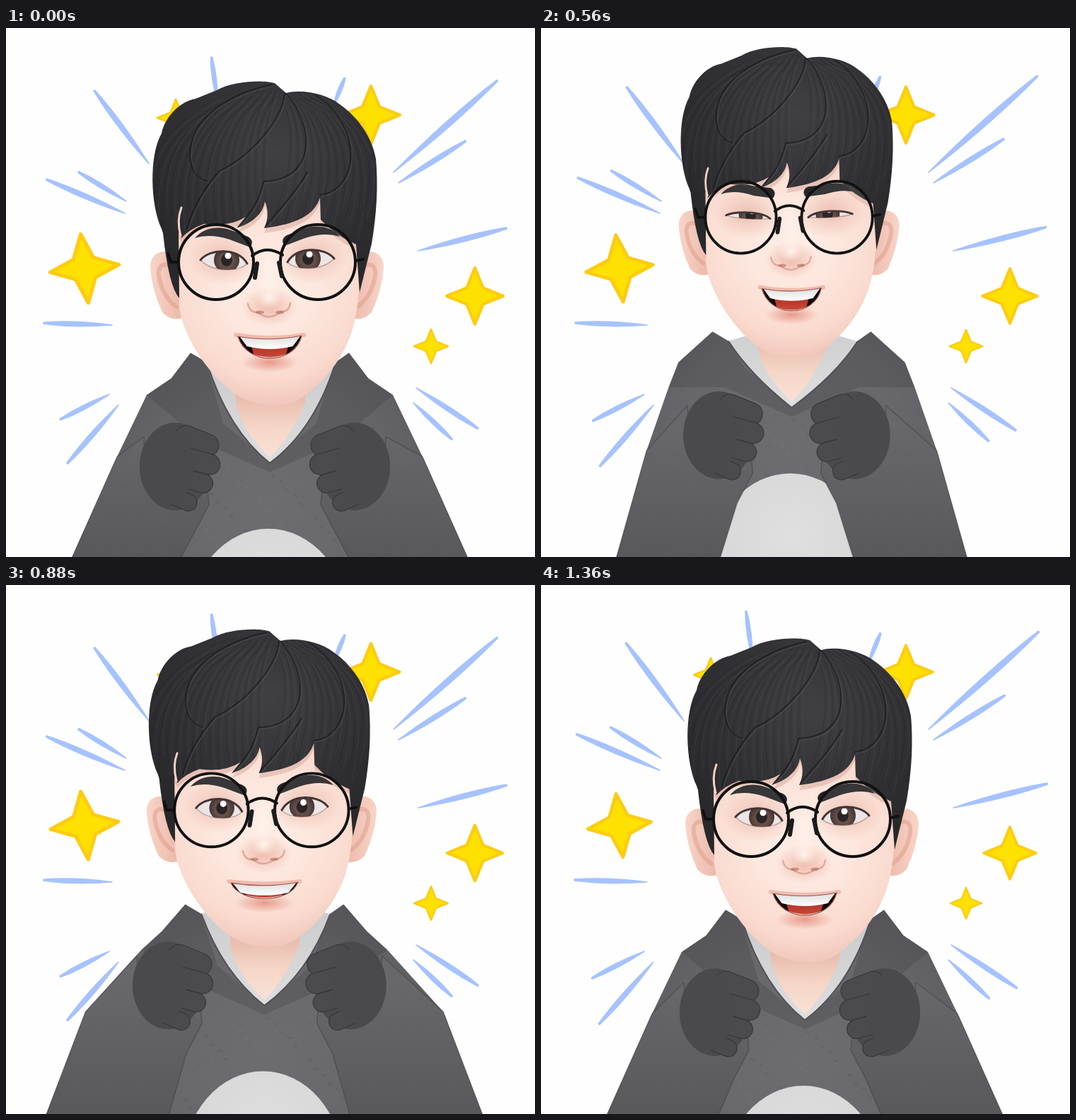
Animation of 748 by 748 pixels, one loop 1.44 s. Source, as an HTML page with a canvas:

```html
<!DOCTYPE html>
<html lang="en">
<head>
<meta charset="utf-8">
<title>Cheering avatar</title>
<style>
  html, body { margin: 0; width: 100%; height: 100%; overflow: hidden; background: #fff; }
  canvas { display: block; width: 100vw; height: 100vh; }
</style>
</head>
<body>
<canvas id="stage" width="748" height="748"></canvas>
<script>
const ctx = document.getElementById('stage').getContext('2d');
const STEP = 80, STEPS = 18;

// x, y: tip of the neckline, from which the body and head follow.
// flare: elbows out; nod: face moved down; spread, hand: fists about the neckline.
const cheer = { x: 373, y: 614, flare: 0, nod: 0, spread: 119, hand: 6, mouth: 31, eye: 25, frown: 7 };
const clap = { x: 353, y: 506, flare: 0, nod: 6, spread: 50, hand: 170, mouth: 29, eye: 36, frown: 4 };
const open = { ...clap, x: 350, y: 509, nod: -10, spread: 100, hand: 120, mouth: 46, eye: 35, frown: -3 };
const blink = { ...cheer, x: 356, y: 545, nod: -3, spread: 84, hand: 12, mouth: 28, eye: 0, frown: 1 };
const wide = { ...cheer, x: 363, y: 585, flare: 1, nod: 7, spread: 128, hand: -25, mouth: 20, eye: 27 };
const lean = { ...cheer, x: 372, y: 618, spread: 102, hand: -34 };
const rest = { ...cheer, spread: 112, hand: -10 };

// step, pose, ray length, star size
const keys = [
  [0, cheer, .94, 1], [2, clap, .91, .97], [5, open, 1, .97], [8, blink, .98, .97],
  [10, wide, .91, 1.02], [13, lean, 1, .92], [17, rest, 1, .92], [18, cheer, .94, 1]
];
// inner and outer end of each ray
const rays = [
  [202, 192, 120, 82], [168, 262, 50, 211], [170, 245, 98, 201], [150, 420, 47, 417],
  [146, 518, 72, 556], [159, 533, 82, 621], [548, 204, 704, 66], [555, 219, 656, 156],
  [583, 315, 716, 281], [580, 509, 673, 570], [576, 530, 634, 585], [299, 105, 290, 37], [463, 110, 480, 68]
];
// centre and radius
const stars = [[111, 340, 50], [516, 123, 42], [663, 379, 41], [601, 450, 25], [240, 127, 27]];

const skin = new Path2D('M240 290 Q242 375 250 410 C262 450 290 490 322 515 C348 534 392 541 420 523 C455 498 486 460 496 410 Q505 365 504 280 L480 180 H260Z');
const ear = new Path2D('M-129 322 C-143 311 -165 316 -165 338 Q-163 370 -148 402 Q-135 416 -117 409Z');
const earFold = new Path2D('M-131 342 C-145 328 -155 336 -153 350 Q-148 380 -128 394');
const hair = new Path2D('M222 284 C206 250 204 180 222 149 C226 128 246 104 270 100 L300 88 C322 75 365 73 382 78 L398 92 C420 86 455 93 474 108 C500 126 520 155 525 185 Q530 240 519 305 L502 374 L497 306 Q468 294 447 271 L446 240 C438 264 415 277 367 283 Q376 264 368 245 C366 262 350 276 328 283 L341 267 Q318 282 282 277 Q262 284 250 297 L246 288 L247 382 Q232 365 224 290Z');
const locks = new Path2D('M378 80 C330 90 262 120 262 180 Q264 210 286 217 M396 93 C392 130 350 180 304 202 Q270 240 258 284 M398 92 C440 140 440 215 366 217 Q358 255 330 280 M440 95 C510 140 500 230 446 236 M428 204 Q412 232 368 281');

const lerp = (a, b, t) => a + (b - a) * t;
const mix = (a, b, t) => Object.fromEntries(Object.keys(a).map(k => [k, lerp(a[k], b[k], t)]));
const times = (n, draw) => { for (let i = 0; i < n; i++) draw(i); };

function fill(path, color) { ctx.fillStyle = color; ctx.fill(path); }
function stroke(path, color, width) {
  ctx.strokeStyle = color;
  ctx.lineWidth = width;
  ctx.stroke(path);
}
function poly(points) {
  const p = new Path2D();
  for (const [x, y] of points) p.lineTo(x, y);
  p.closePath();
  return p;
}
function oval(x, y, rx, ry) {
  const p = new Path2D();
  p.ellipse(x, y, rx, ry, 0, 0, Math.PI * 2);
  return p;
}
function shade(g, colors) {
  colors.forEach((c, i) => g.addColorStop(i / (colors.length - 1), c));
  return g;
}
const radial = (x, y, r, ...colors) => shade(ctx.createRadialGradient(x, y, 0, x, y, r), colors);
const linear = (x0, y0, x1, y1, ...colors) => shade(ctx.createLinearGradient(x0, y0, x1, y1), colors);
function glow(x, y, rx, ry, rgb, alpha) {
  at(x, y, rx, ry, () => fill(oval(0, 0, 1, 1), radial(0, 0, 1, `rgba(${rgb},${alpha})`, `rgba(${rgb},0)`)));
}
function at(x, y, sx, sy, draw) {
  ctx.save();
  ctx.translate(x, y);
  ctx.scale(sx, sy);
  draw();
  ctx.restore();
}
function inside(path, draw) {
  ctx.save();
  ctx.clip(path);
  draw();
  ctx.restore();
}

function drawRays(size) {
  for (const [x, y, ex, ey] of rays) at(x, y, 1, 1, () => {
    const full = Math.hypot(ex - x, ey - y), len = full * size, w = 5 + full * .02;
    ctx.rotate(Math.atan2(ey - y, ex - x));
    const p = new Path2D(`M0 0 Q${len * .55} ${-w * .8} ${len} -1 V1 Q${len * .55} ${w * .8} 0 0Z`);
    fill(p, '#a6c2ff');
    stroke(p, '#a6c2ff', 1.6);
  });
}
function drawStars(size) {
  stars.forEach(([x, y, r], n) => at(x, y, size, size, () => {
    const points = [];
    times(8, i => {
      const a = i * Math.PI / 4 - Math.PI / 2, d = (r - 1) * (i % 2 ? .41 : 1);
      points.push([Math.cos(a) * d, Math.sin(a) * d]);
    });
    ctx.rotate(n ? 0 : -.11);
    fill(poly(points), '#ffe100');
    stroke(poly(points), '#ffcb12', r * .1);
  }));
}

// one side of the coat, from the hood down to the elbow
function outline({ x, y, flare }, side) {
  const q = (y - 506) / 110;
  return [
    [112, lerp(-88, -156, q)], [lerp(168, 139, q), lerp(-42, -120, q)], [174, lerp(-2, -97, q)],
    [lerp(201, 216, q) + flare * 54, lerp(88, -10, q)], [lerp(236, 281, q) + flare * 50, 750 - y]
  ].map(([dx, dy]) => [x + side * dx, y + dy]);
}

function drawBody(pose) {
  const { x, y } = pose, left = outline(pose, -1), right = outline(pose, 1);
  const rim = left[0][1] + 14;
  fill(poly([[x - 92, rim], [x - 54, rim - 11], [x + 56, rim - 11], [x + 94, rim], [x + 80, y - 25], [x, y + 8], [x - 80, y - 25]]),
    linear(x, y - 130, x, y, '#cbcccd', '#dededf'));
  fill(new Path2D(`M${x - 50} ${y - 150} L${x - 48} ${y - 82} Q${x - 38} ${y - 42} ${x} ${y - 7} Q${x + 32} ${y - 38} ${x + 50} ${y - 86} V${y - 150}Z`),
    linear(x, y - 95, x, y, '#e7bbab', '#f6d7c9', '#fae3d8'));

  const collar = `${x - 88} ${rim} Q${x - 58} ${y - 46} ${x} ${y} Q${x + 62} ${y - 46} ${x + 92} ${rim}`;
  const coat = new Path2D(`M${[...left].reverse().join('L')} L${collar} L${right.join('L')}Z`);
  fill(coat, radial(x, y + 60, 310, '#6d6d71', '#68686c', '#57575a'));
  inside(coat, () => {
    [left, right].forEach((side, i) => {
      const s = i ? -1 : 1;
      fill(poly([...side.slice(0, 3), [x - s * 95, y - 28], [x, y + 14], [x, y], [x - s * 66, y - 55], [x - s * 90, rim]]), 'rgba(48,48,52,.2)');
    });
    stroke(new Path2D('M' + collar), '#525256', 4);
    // short nap of the cloth
    times(170, i => {
      const px = x - 230 + i * 137 % 460, py = y + 10 + i * 83 % 240;
      stroke(new Path2D(`M${px} ${py}l4 2`), i % 2 ? 'rgba(135,135,140,.16)' : 'rgba(40,40,44,.12)', 2);
    });
    fill(oval(x - 2, y + 224, 112, 130), radial(x, y + 180, 120, '#dfdfdf', '#d7d7d8'));
  });
}

function drawSleeve(x, y, side, shoulder, elbow) {
  const p = poly([
    shoulder, [x + side * 52, y - 42], [x + side * 50, y + 20], [x - side * 38, y + 30], [x - side * 40, y + 54],
    [x - side * 18, y + 96], [x + side * 14, 775], elbow
  ]);
  fill(p, linear(0, 560, 0, 748, '#68686c', '#59595c'));
  stroke(p, 'rgba(58,58,61,.45)', 1.5);
}
function finger(x, y, ex, ey, w) {
  const p = new Path2D(`M${x} ${y}L${ex} ${ey}`);
  stroke(p, '#39393c', w);
  stroke(p, '#4b4b4e', w - 2.5);
}
const palm = (...size) => fill(oval(...size), '#4a4a4d');

function drawFist(x, y, side, [, , , shoulder, elbow]) {
  drawSleeve(x, y, side, shoulder, elbow);
  at(x, y, -side, 1, () => {
    palm(-8, 0, 50, 62);
    times(4, i => finger(8 - 6 * i, -42 + 28 * i, 38 + 9 * i - 6 * i * i, -30 + 27 * i, 33 - 2.5 * i));
    palm(-20, 0, 38, 54);
  });
}
function drawClap() {
  palm(350, 688, 66, 58);
  palm(385, 655, 32, 36);
  finger(371, 586, 378, 622, 27);
  palm(382, 638, 24, 22);
  times(2, i => finger(407 - 5 * i, 632 + 22 * i, 338 - 5 * i, 663 + 22 * i, 22));
  times(3, i => finger(370 - 20 * i, 665 + 28 * i, 285 - 8 * i, 703 + 16 * i, 25));
}
function drawSpreadHand() {
  palm(205, 634, 42, 56);
  times(4, i => {
    const a = -(99 + 15 * i + 1.2 * i * i) * Math.PI / 180, len = 118 - 5 * i * i;
    const dx = Math.cos(a) * len, dy = Math.sin(a) * len;
    finger(205 + dx, 630 + dy, 205 + dx * .35, 630 + dy * .35, 27);
  });
  finger(274, 561, 232, 620, 29);
  palm(207, 632, 38, 48);
}
function drawThumbHand() {
  palm(428, 662, 42, 50);
  finger(443, 557, 440, 635, 33);
  palm(436, 655, 28, 36);
  times(3, i => finger(420, 672 + 18 * i, 383, 678 + 16 * i, 24));
  finger(380, 715, 348, 722, 23);
}
function drawArms(step, pose) {
  const { x, y, spread, hand } = pose, sides = [-1, 1];
  if (step < 2 || step > 6) {
    for (const s of sides) drawFist(x - 7 + s * spread, y + hand, s, outline(pose, s));
    return;
  }
  const clapping = step < 4, inward = [30, 0, 12][step - 4] || 0;
  const wrists = clapping ? [[295, 674], [415, 660]] : [[222, 652], [425, 690]];
  at(x - (clapping ? clap : open).x, y - (clapping ? clap : open).y, 1, 1, () => {
    sides.forEach((s, i) => {
      const [, , , top, elbow] = outline(pose, s), [wx, wy] = wrists[i];
      drawSleeve(wx - s * inward, wy, s, [0, 1].map(k => lerp(top[k], elbow[k], .6)), elbow);
    });
    if (clapping) return drawClap();
    at(inward, 0, 1, 1, drawSpreadHand);
    at(-inward, 0, 1, 1, drawThumbHand);
  });
}

function drawEye(x, y, side, { eye: h, frown }) {
  at(x, y, side, 1, () => {
    glow(0, -2, 52, 38, '222,160,144', .6);
    if (h < 5) {
      stroke(new Path2D('M-33 6 Q-2 17 34 8'), '#2a2022', 4);
    } else {
      const lid = `M-33 0 C-20 ${-h * .66} 20 ${-h * .72} 33 5`;
      const p = new Path2D(`${lid} C22 ${h * .7} -16 ${h * .72} -33 0Z`);
      fill(p, '#e9e4e4');
      inside(p, () => {
        fill(oval(4, 0, 18, 18), radial(4, 2, 19, '#4c3834', '#5a423d', '#302223'));
        fill(oval(4, 0, 8, 9), '#181314');
        fill(oval(4 + side * 2, -6, 4.5, 4.5), '#fff');
      });
      stroke(p, 'rgba(120,75,70,.5)', 1.2);
      stroke(new Path2D(lid), '#332527', 3);
    }
    const b = frown;
    fill(new Path2D(`M-41 -31 C-28 -46 -8 -48 8 -43 L34 ${b - 40} Q44 ${b - 34} 37 ${b - 25} L8 -29 Q-20 -38 -41 -31Z`), '#262629');
  });
}
function drawMouth(h) {
  const w = 56 - h * .35;
  at(375, 436, 1, 1, () => {
    stroke(new Path2D(`M${-w - 3} -2 Q0 ${h * .2} ${w + 3} -2`), 'rgba(230,160,145,.6)', 6);
    glow(0, h + 6, w * .9, 14, '226,138,122', .8);
    const p = new Path2D(`M${-w} 0 Q0 8 ${w} -1 C${w * .78} ${h * 1.32} ${-w * .72} ${h * 1.35} ${-w} 0Z`);
    fill(p, '#0d0808');
    inside(p, () => {
      fill(poly([[-w * .62, 8], [w * .62, 8], [w * .44, h + 4], [-w * .44, h + 4]]), linear(0, 8, 0, h, '#a72d22', '#cb4937'));
      fill(new Path2D(`M${-w} -3 H${w} L${w * .72} 14 Q0 22 ${-w * .72} 14Z`), linear(0, 0, 0, 18, '#dedede', '#fff'));
      stroke(new Path2D(`M${-w * .8} ${h * .72} Q0 ${h * 1.35} ${w * .8} ${h * .72}`), '#e5e2df', 5);
    });
    stroke(p, '#a8594e', 1.2);
  });
}
function drawNose() {
  glow(374, 394, 40, 28, '232,165,148', .7);
  glow(374, 381, 18, 17, '255,242,235', 1);
  glow(374, 345, 14, 40, '255,244,238', .6);
  stroke(new Path2D('M344 390 Q347 403 358 402 Q374 415 391 401 Q402 402 404 389'), 'rgba(208,138,122,.6)', 2.4);
  for (const x of [361, 389]) fill(oval(x, 402, 6, 2.5), 'rgba(165,90,78,.5)');
}
function drawGlasses() {
  for (const x of [299, 443]) {
    fill(oval(x, 331, 53, 53), 'rgba(255,240,230,.08)');
    stroke(oval(x, 331, 53, 53), '#111', 4);
  }
  stroke(new Path2D('M350 322 Q371 306 393 321 M246 331 H235 L231 319 M497 329 L507 327'), '#111', 4);
  stroke(new Path2D('M357 333 L354 353 M388 332 L392 351'), '#1c1c1c', 6);
}
function drawHair() {
  fill(hair, radial(385, 175, 210, '#404044', '#343438', '#28282b'));
  inside(hair, () => {
    times(54, i => {
      const x = 205 + i * 6.1, bend = x < 385 ? -14 : 22;
      stroke(new Path2D(`M${lerp(390, x, .35)} ${88 + i % 4 * 5} C${lerp(390, x, .8) + bend} 130 ${x + bend} 190 ${x - 4} ${260 + i % 5 * 9}`),
        i % 2 ? 'rgba(100,100,106,.16)' : 'rgba(14,14,16,.16)', 1.3);
    });
    at(2, 2, 1, 1, () => stroke(locks, 'rgba(92,92,98,.3)', 2));
    stroke(locks, 'rgba(21,21,23,.6)', 2);
  });
  stroke(new Path2D('M250 254 Q243 272 249 294'), '#f2d2c5', 3);
}

function drawHead(pose) {
  const { x, y, nod } = pose, drop = y - cheer.y;
  at(x - 2, 76 + drop * .62, 1 + drop * .0007, 1 + drop * .0006 - nod * .0015, () => {
    ctx.translate(-373, -76);
    for (const s of [-1, 1]) at(371, 0, s, 1, () => {
      fill(ear, linear(-165, 0, -120, 0, '#f8d5c8', '#ecb9aa'));
      stroke(earFold, 'rgba(218,148,132,.45)', 6);
    });
    fill(skin, radial(372, 365, 198, '#feede5', '#fde7de', '#fadacf', '#eab8aa'));
    inside(skin, () => at(0, 7, 1, 1, () => fill(hair, 'rgba(190,125,110,.3)')));
    at(0, nod, 1, 1, () => {
      drawEye(310, 328, 1, pose);
      drawEye(433, 326, -1, pose);
      drawNose();
      drawMouth(pose.mouth);
    });
    drawHair();
    at(0, nod, 1, 1, drawGlasses);
  });
}

function render(step) {
  const i = keys.findIndex(k => k[0] > step) - 1;
  const [from, a, ray, star] = keys[i], [to, b, nextRay, nextStar] = keys[i + 1];
  const u = (step - from) / (to - from);
  const pose = mix(a, b, u * u * (3 - 2 * u));
  ctx.fillStyle = '#fefefe';
  ctx.fillRect(0, 0, 748, 748);
  ctx.lineCap = ctx.lineJoin = 'round';
  drawRays(lerp(ray, nextRay, u));
  drawStars(lerp(star, nextStar, u));
  drawBody(pose);
  drawHead(pose);
  drawArms(step, pose);
}

const start = performance.now();
let shown = -1;
function tick() {
  const step = Math.floor((performance.now() - start) / STEP) % STEPS;
  if (step !== shown) render(shown = step);
  requestAnimationFrame(tick);
}
tick();
</script>
</body>
</html>
```
